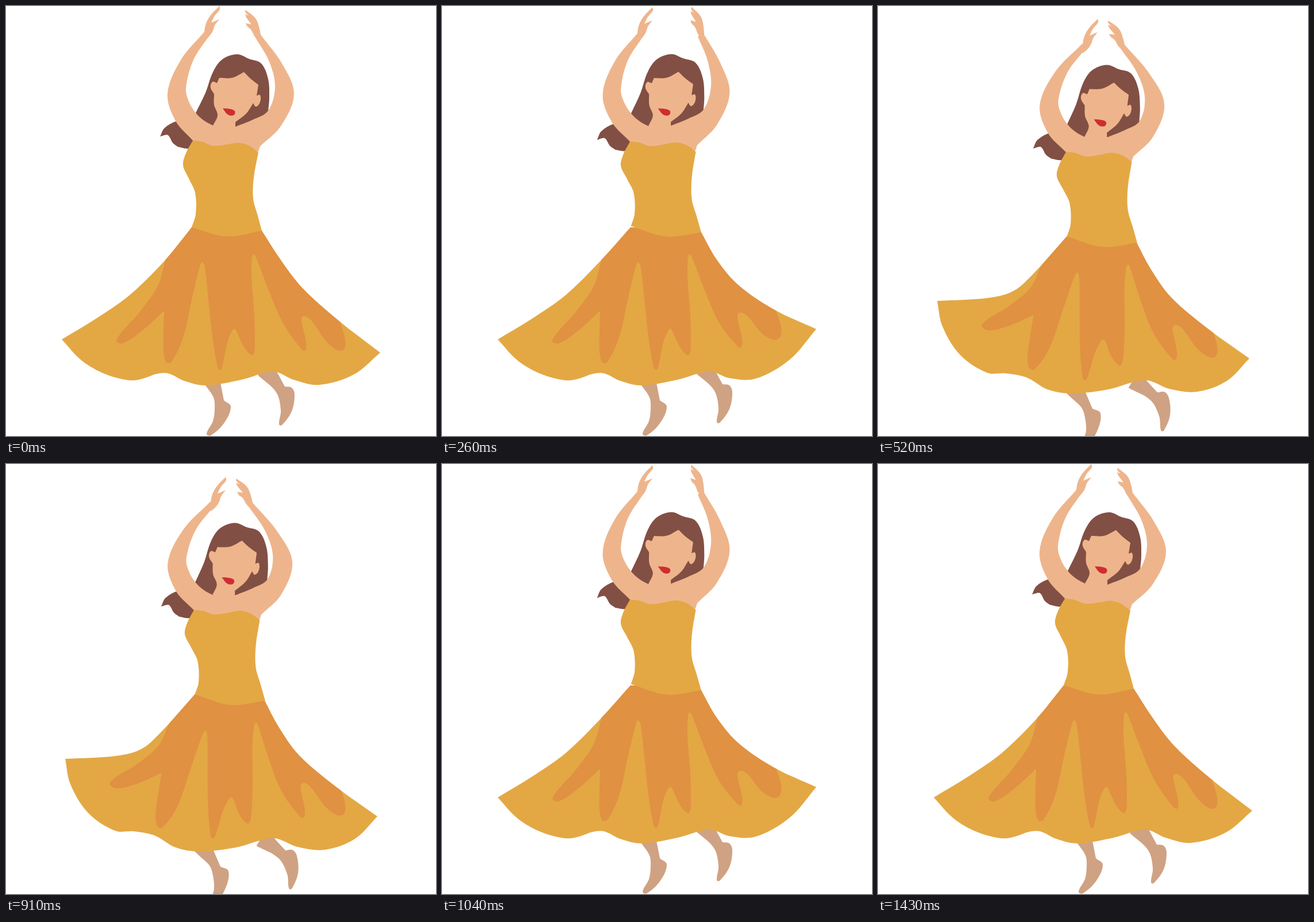
An HTML page for the animation above (1.56 s loop, 748 px wide and 748 px high).

```html
<!DOCTYPE html>
<html lang="en">
<head>
<meta charset="utf-8">
<title>Dancer</title>
<style>
  html, body { margin: 0; height: 100%; overflow: hidden; background: #fff; }
  svg { display: block; width: 100vw; height: 100vh; }
</style>
</head>
<body>
<svg id="stage" viewBox="0 0 748 748"></svg>
<script>
const color = {
  hair: '#824f44', skin: '#eeb58c', lips: '#cf2d30',
  dress: '#e3a844', fold: '#e09142', leg: '#cfa283'
};

// Outlines run smoothly through their points; "|" makes the point before it a corner.
const tail = '335,195 298,200 276,212 268,227 | 280,224 284,227 290,238 299,245 | 318,248 335,240';
const hair = '330,186 347,151 360,115 376,93 402,84 423,92 | 444,100 456,127 458,160 456,184 | 456,190 | 400,216 340,205';
const face = '371,125 393,125 414,115 | 426,127 439,137 | 436,156 | 442,155 442,167 435,175 430,169 | 418,187 399,202 | 399,214 | 360,214 | 360,208 | 368,190 362,172 362,153 | 356,142 359,132 367,134';
const lips = '377,178 389,179 398,183 396,190 386,189 377,178';
const leftHand = '345,60 345,45 348,30 356,16 371,0 | 372,6 363,17 357,29 | 371,23 | 363,34 360,43 354,52 345,60';
const rightHand = '443,60 443,50 438,29 432,19 417,7 | 416,10 422,17 | 416,14 | 418,20 427,32 | 417,30 | 420,36 426,41 434,55 443,60';
const leftLeg = '340,650 347,660 361,681 363,700 360,722 349,744 356,747 379,726 391,697 379,686 | 372,650';
const rightLeg = '438,642 470,672 478,703 475,728 480,729 497,705 502,676 497,664 485,662 | 471,636 | 450,630';
const arms = '345,45 304,94 281,152 295,200 325,234 | 350,262 | 430,262 | 439,253 | 442,244 | 478,209 501,153 480,100 443,50 | 434,55 | 458,97 468,141 456,182 429,198 399,210 | 360,208 | 344,199 330,186 318,166 313,143 326,94 354,51';
const bodice = '325,234 341,236 360,243 383,241 405,238 423,243 439,255 | 431,298 430,335 438,365 445,391 | 384,401 323,385 | 330,362 329,325 318,300 308,277 313,256 325,234';
const skirt = '323,385 276,443 215,503 158,543 97,580 | 132,617 172,640 213,651 235,649 262,640 282,639 310,652 347,660 410,650 465,636 500,650 545,659 605,641 651,603 | 577,546 515,490 478,442 445,391';
const sweptSkirt = '329,400 270,466 235,496 190,508 103,513 | 112,557 143,607 190,638 222,639 258,646 295,667 335,674 400,667 465,651 507,666 555,671 607,652 646,613 | 576,563 510,507 474,457 449,410';
const folds = '277,380 277,443 | 264,487 232,533 192,581 203,587 239,563 275,530 | 274,565 274,600 279,620 288,619 308,577 324,507 338,450 342,446 346,456 352,510 359,575 367,623 372,633 377,624 385,585 394,564 398,562 403,570 413,592 426,607 431,605 433,590 432,540 427,470 428,437 431,432 436,440 457,495 482,552 515,598 521,599 522,585 517,562 514,543 520,539 532,548 556,582 577,599 588,597 590,580 582,552 | 582,380';

const same = (x, y) => [x, y];

// Arms bend by a parabola in the height above the shoulder.
const bendArms = (left, right) => (x, y) => {
  const [linear, square, dy] = x < 390 ? left : right;
  const u = Math.max(0, (234 - y) / 189);
  return [x + 2 + linear * u + square * u * u, y + dy];
};

const leanBody = drop => (x, y) => [
  x + 2 + 0.025 * (y - 235),
  y + drop + (x - 382) * (0.0005 * (y - 235) - 0.035)
];

const liftRight = (x, y) => [
  x + 5 * Math.max(0, 1 - (y - 385) / 45),
  y - 41 * Math.max(0, (x - 465) / 186) ** 1.6
];

const sweepLeft = (x, y) => {
  const swing = Math.min(1, Math.max(0, 1 - (x - 280) / 300));
  return [
    x + (7 - 0.131 * (y - 443)) * swing,
    y + 18 - 0.42 * Math.max(0, 300 - x) - 0.06 * Math.max(0, x - 480)
  ];
};

const poses = [
  { arms: same, body: same, skirt: same, folds: same },
  {
    arms: bendArms([-9, 2.5, 2], [-19, 30, -2]),
    body: leanBody(0), skirt: liftRight, folds: liftRight,
    head: 'translate(-1 0) rotate(-1 385 200)',
    tail: 'translate(2 4) rotate(-2 325 236)',
    leftHand: 'translate(-5 2)',
    rightHand: 'translate(13 -3) rotate(5.5 443 50)',
    rightLeg: 'translate(3 -4)'
  },
  {
    arms: bendArms([-13, 21.5, 20.5], [-8, -8, 18]),
    body: leanBody(18), outline: sweptSkirt, skirt: same, folds: sweepLeft,
    head: 'translate(-1 19) rotate(-1.7 385 200)',
    tail: 'translate(2 20) rotate(-1 325 236)',
    leftHand: 'translate(11 22.5)',
    rightHand: 'translate(-14 17) rotate(-3 443 50)',
    leftLeg: 'translate(-5 16) rotate(-12 370 690)',
    rightLeg: 'translate(3 10) rotate(-14 485 670)'
  }
];

function smooth(points) {
  const handle = (i, sign, length) => {
    const [ax, ay] = points[Math.max(0, i - 1)];
    const [bx, by] = points[Math.min(points.length - 1, i + 1)];
    const k = sign * length / 3 / Math.hypot(bx - ax, by - ay);
    return [points[i][0] + (bx - ax) * k, points[i][1] + (by - ay) * k];
  };
  return points.slice(1).map((end, i) => {
    const length = Math.hypot(end[0] - points[i][0], end[1] - points[i][1]);
    return 'C' + [handle(i, 1, length), handle(i + 1, -1, length), end].join(' ');
  }).join('');
}

function toPath(outline, warp = same) {
  let corner;
  return outline.split('|').map(run => {
    const points = run.trim().split(' ').map(p => warp(...p.split(',').map(Number)));
    const move = corner ? '' : 'M' + points[0];
    if (corner) points.unshift(corner);
    corner = points.at(-1);
    return move + smooth(points);
  }).join('') + 'Z';
}

const shape = (outline, fill, { warp, move = '', clip } = {}) =>
  `<path d="${toPath(outline, warp)}" fill="${fill}" transform="${move}"` +
  (clip ? ` clip-path="url(#${clip})"/>` : '/>');

function drawPose(p, i) {
  const outline = p.outline ?? skirt;
  const clip = 'skirt' + i;
  return `<g class="pose" visibility="hidden">
    <clipPath id="${clip}"><path visibility="visible" d="${toPath(outline, p.skirt)}"/></clipPath>` + [
    shape(leftLeg, color.leg, { move: p.leftLeg }),
    shape(rightLeg, color.leg, { move: p.rightLeg }),
    shape(tail, color.hair, { move: p.tail }),
    shape(hair, color.hair, { move: p.head }),
    shape(arms, color.skin, { warp: p.arms }),
    shape(leftHand, color.skin, { move: p.leftHand }),
    shape(rightHand, color.skin, { move: p.rightHand }),
    shape(face, color.skin, { move: p.head }),
    shape(lips, color.lips, { move: p.head }),
    shape(outline, color.dress, { warp: p.skirt }),
    shape(folds, color.fold, { warp: p.folds, clip }),
    shape(bodice, color.dress, { warp: p.body })
  ].join('') + '</g>';
}

const STEP = 130;
const order = [0, 2, 1, 1, 2, 0];
const stage = document.getElementById('stage');
stage.innerHTML = poses.map(drawPose).join('');
const groups = [...stage.querySelectorAll('.pose')];

let start;
function render(now) {
  start ??= now;
  const current = order[Math.floor((now - start) / STEP) % order.length];
  groups.forEach((group, i) =>
    group.setAttribute('visibility', i === current ? 'visible' : 'hidden'));
  requestAnimationFrame(render);
}
requestAnimationFrame(render);
</script>
</body>
</html>
```
